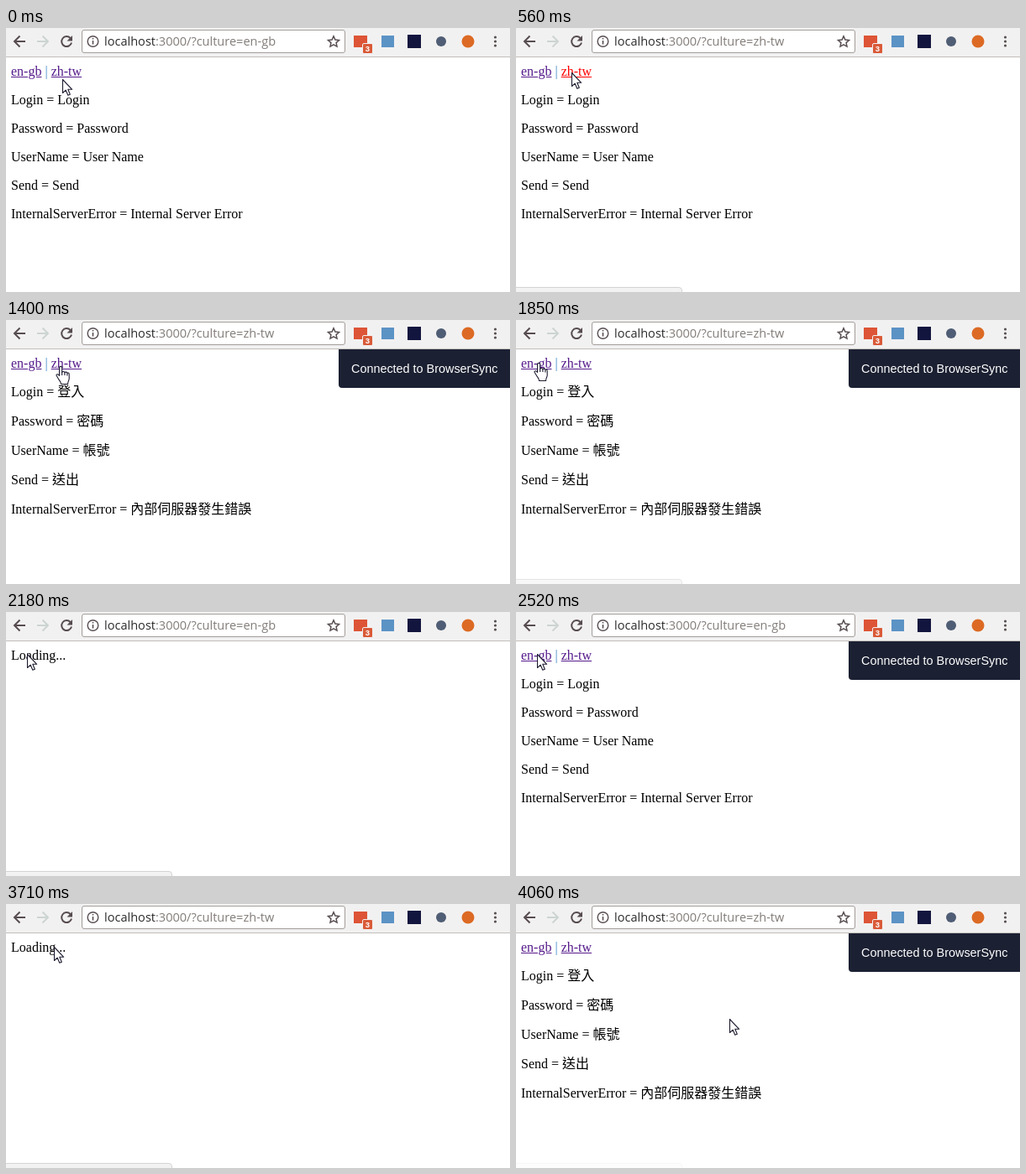
An HTML page that plays this animation: 600x315 px, repeating every 7060 ms.

```html
<!DOCTYPE html>
<html lang="zh-TW">
<head>
<meta charset="utf-8">
<title>Culture switch</title>
<style>
html, body { margin: 0; width: 100%; height: 100%; overflow: hidden; background: #fff; }
#stage { position: absolute; left: 0; top: 0; width: 600px; height: 315px; overflow: hidden; background: #fff; }
svg { position: absolute; left: 0; top: 0; overflow: visible; }

.line { position: absolute; left: 6px; white-space: pre; color: #000;
  font: 16px/18px "Liberation Serif", "Noto Sans CJK TC", "Noto Sans CJK", serif; }
.nav { top: 43px; color: #3a87c8; }
.nav span { color: #551a8b; text-decoration: underline; }
.host { font: 14.55px "Open Sans", sans-serif; fill: #2b2b2b; }
.host .path { fill: #827c78; }

#toast { position: absolute; left: 396px; top: 35px; width: 204px; height: 46px; box-sizing: border-box;
  padding-left: 15px; background: #1b2032; color: #fff; border-radius: 0 0 0 4px; white-space: nowrap;
  font: 14.4px/46px "Liberation Sans", sans-serif; }
#status { position: absolute; left: -1px; top: 309px; width: 197px; height: 20px; opacity: 0;
  background: #f2f2f2; border: 1px solid #d4d4d4; border-radius: 0 4px 0 0; }

/* One 7060 ms loop; every change is a hard cut */
.anim { animation: 7060ms step-end infinite; }
.english { animation-name: english; }
.chinese { animation-name: chinese; }
.loading { animation-name: loading; }
.nav { animation-name: ready; }
.urlEn { animation-name: urlEn; }
.urlZh { animation-name: urlZh; }
#linkEn { animation-name: pressEn; }
#linkZh { animation-name: pressZh; }
#toast { animation-name: toast; }
#status { animation-name: status; }
#cursor { animation-name: move; }
#arrow { animation-name: arrow; }
#hand { animation-name: hand; }

@keyframes english { 0%, 33.99% { opacity: 1 } 9.34%, 52.54% { opacity: 0 } }
@keyframes chinese { 0%, 30.87% { opacity: 0 } 13.73%, 55.8% { opacity: 1 } }
@keyframes ready { 0%, 13.73%, 33.99%, 55.8% { opacity: 1 } 9.34%, 30.87%, 52.54% { opacity: 0 } }
@keyframes loading { 0%, 13.73%, 33.99%, 55.8% { opacity: 0 } 9.34%, 30.87%, 52.54% { opacity: 1 } }
@keyframes urlEn { 0%, 29.32% { opacity: 1 } 7.64%, 52.54% { opacity: 0 } }
@keyframes urlZh { 0%, 29.32% { opacity: 0 } 7.64%, 52.54% { opacity: 1 } }
@keyframes pressEn { 0%, 30.87% { color: #551a8b } 27.62% { color: #f00 } }
@keyframes pressZh { 0%, 9.34%, 52.54% { color: #551a8b } 6.09%, 49.57% { color: #f00 } }
@keyframes toast { 0%, 30.87%, 52.54% { opacity: 0 } 10.9%, 32.43%, 54.24% { opacity: 1 } }
@keyframes status {
  0%, 13.73%, 35.69% { opacity: 0 }
  6.09%, 26.2%, 44.75% { opacity: .6 }
  7.64%, 27.62%, 46.31% { opacity: 1 }
  55.8% { opacity: .2 }
}
@keyframes move {
  0% { transform: translate(67px, 61px) }
  1.41% { transform: translate(66px, 54px) }
  2.83% { transform: translate(66px, 53px) }
  19.83% { transform: translate(63px, 54px) }
  21.38% { transform: translate(52px, 55px) }
  22.94% { transform: translate(40px, 54px) }
  24.5% { transform: translate(30px, 52px) }
  26.2% { transform: translate(25px, 50px) }
  43.2% { transform: translate(34px, 51px) }
  44.75% { transform: translate(49px, 52px) }
  46.31% { transform: translate(57px, 51px) }
  54.24% { transform: translate(100px, 75px) }
  55.8% { transform: translate(190px, 115px) }
  57.5%, 100% { transform: translate(254px, 137px) }
}
@keyframes arrow {
  0%, 6.09%, 21.38%, 27.62%, 44.75%, 49.57% { opacity: 1 }
  1.41%, 19.83%, 22.94%, 43.2%, 46.31% { opacity: 0 }
}
@keyframes hand {
  0%, 6.09%, 21.38%, 27.62%, 44.75%, 49.57% { opacity: 0 }
  1.41%, 19.83%, 22.94%, 43.2%, 46.31% { opacity: 1 }
}
</style>
</head>
<body>
<div id="stage">
  <svg width="600" height="35">
    <rect width="600" height="35" fill="#f2f1f1"/>
    <rect y="34" width="600" height="1" fill="#c2bebb"/>
    <rect x="90.5" y="2.5" width="313" height="27" rx="2.5" fill="#fff" stroke="#a19c99"/>
    <g fill="none" stroke="#574d50" stroke-width="2">
      <path d="M23 16H10.5M16.5 9.5L10 16l6.5 6.5"/>
      <path d="M37 16H49.5M43.5 9.5L50 16l-6.5 6.5" stroke="#ccd5d1"/>
      <path d="M76.6 12A6 6 0 1 0 78 17.6"/>
      <path d="M79 9v6.5h-6.5z" fill="#574d50" stroke="none"/>
      <circle cx="103.5" cy="16" r="6.3" stroke-width="1.4"/>
      <path d="M103.5 15v4.5M103.5 12v1.6" stroke-width="1.6"/>
      <path d="M390 9.8l1.9 4.2 4.6.5-3.4 3.1.9 4.5-4-2.3-4 2.3.9-4.5-3.4-3.1 4.6-.5z" stroke-width="1.5"/>
    </g>
    <text class="host anim urlEn" x="117" y="21">localhost<tspan class="path">:3000/?culture=en-gb</tspan></text>
    <text class="host anim urlZh" x="117" y="21">localhost<tspan class="path">:3000/?culture=zh-tw</tspan></text>

    <rect x="414" y="9" width="16" height="14" fill="#dd5436"/>
    <rect x="424.5" y="18.5" width="12" height="12" rx="1.5" fill="#d95a38" stroke="#f2f1f1"/>
    <text x="430.5" y="28" text-anchor="middle" fill="#fff" font-family="Liberation Sans, sans-serif" font-size="9.5" font-weight="bold">3</text>
    <rect x="447" y="9" width="15" height="14" fill="#5b93c5"/>
    <rect x="478" y="8" width="16" height="16" fill="#12163f"/>
    <circle cx="518" cy="16" r="6" fill="#4f5d75"/>
    <circle cx="550" cy="16" r="7.5" fill="#dc6a24"/>
    <g fill="#55504f">
      <circle cx="582.5" cy="11" r="1.6"/><circle cx="582.5" cy="16" r="1.6"/><circle cx="582.5" cy="21" r="1.6"/>
    </g>
  </svg>

  <div class="line nav anim"><span id="linkEn" class="anim">en-gb</span> | <span id="linkZh" class="anim">zh-tw</span></div>
  <div class="line loading anim" style="top:43px">Loading...</div>

  <div class="english anim">
    <div class="line" style="top:77px">Login = Login</div>
    <div class="line" style="top:111px">Password = Password</div>
    <div class="line" style="top:145px">UserName = User Name</div>
    <div class="line" style="top:179px">Send = Send</div>
    <div class="line" style="top:213px">InternalServerError = Internal Server Error</div>
  </div>
  <div class="chinese anim">
    <div class="line" style="top:77px">Login = 登入</div>
    <div class="line" style="top:112px">Password = 密碼</div>
    <div class="line" style="top:147px">UserName = 帳號</div>
    <div class="line" style="top:182px">Send = 送出</div>
    <div class="line" style="top:217px">InternalServerError = 內部伺服器發生錯誤</div>
  </div>

  <div id="status" class="anim"></div>
  <div id="toast" class="anim">Connected to BrowserSync</div>

  <svg id="cursor" class="anim" width="1" height="1" fill="#fff" stroke="#1c1c30" stroke-width="1.1" stroke-linejoin="round">
    <path id="arrow" class="anim" d="M.5.5V16.5L4.2 13.200 6.8 19.3 9.3 18.2 6.8 12.3H11.7Z"/>
    <g id="hand" class="anim">
      <path d="M.5 12.500V3a1.600 1.600 0 0 1 3.200 0v5.500c.3-1.300 3-1.300 3.200.4.5-1.200 2.800-1 3 .6.6-.9 2.300-.6 2.300 1.200V16c0 2-1.600 3-1.600 6.500H2.500C2.500 19.500.5 18.500-1 15.500l-1.700-2.800c-.8-1.500.8-2.600 2-1.500z"/>
      <path d="M3.700 8v4M6.900 9v3M9.900 9.500v3" fill="none"/>
    </g>
  </svg>
</div>
</body>
</html>
```
